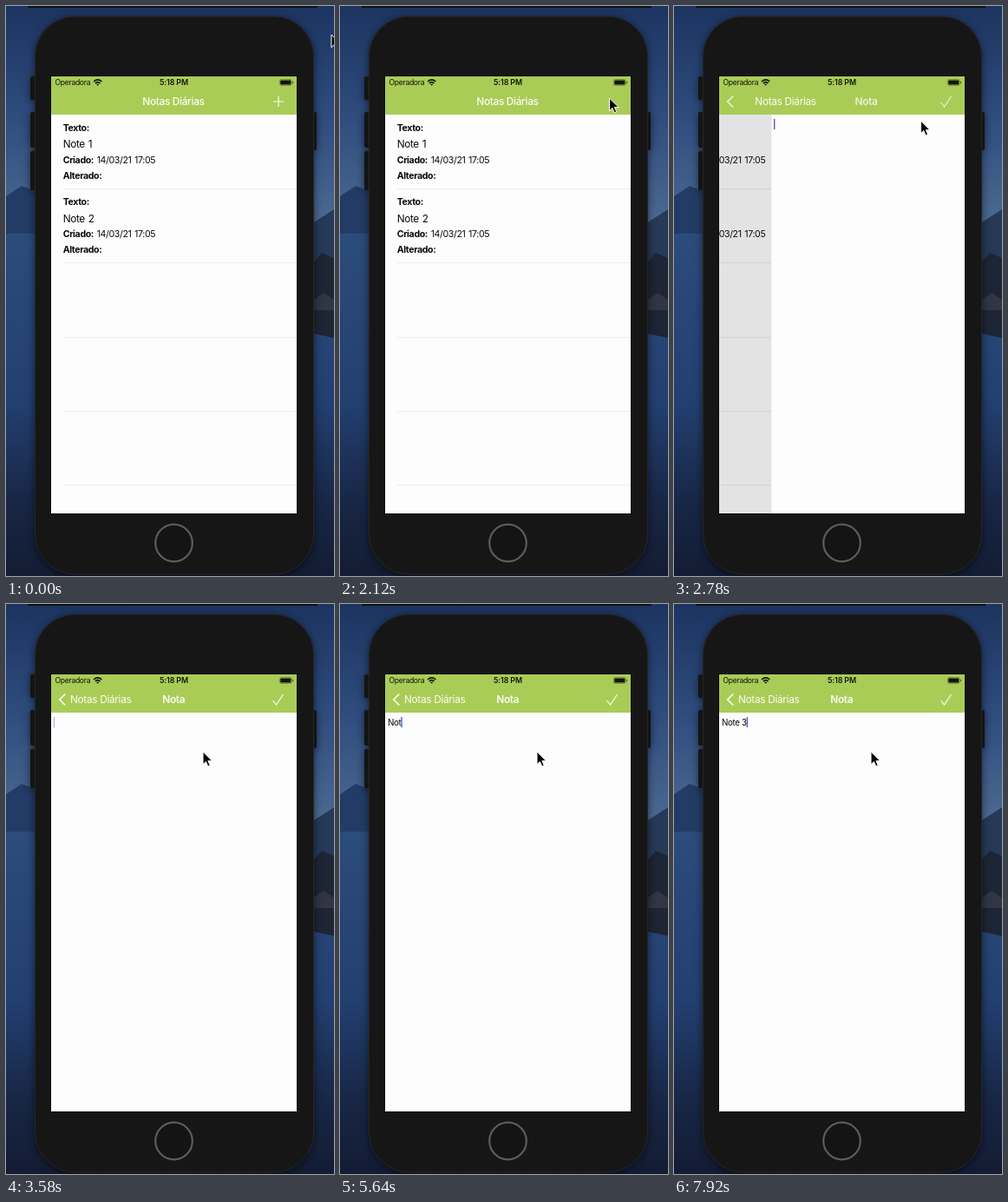
Write an HTML page that moves like this. It is 378 by 656 pixels and loops after 8000 ms.

```html
<!DOCTYPE html>
<html lang="pt">
<head>
<meta charset="utf-8">
<title>Notas</title>
<style>
  html, body { margin: 0; width: 100%; height: 100%; overflow: hidden; background: #16233f; }
  svg { display: block; width: 100%; height: 100%; }
  text { font-family: Inter, Roboto, sans-serif; white-space: pre; }
  .cell { font-size: 10.6px; letter-spacing: -.38px; word-spacing: 1px; fill: #0a0a0a; }
  .bold { font-weight: 700; }
  .note { font-size: 11.8px; letter-spacing: -.35px; }
  .nav { font-size: 11.8px; letter-spacing: -.3px; fill: #fbfdf4; }
  .icon { fill: none; stroke: #fbfdf4; stroke-width: 1.2; }
  .status { font-size: 8.6px; letter-spacing: -.3px; fill: #12160a; }
  .typed { font-size: 9.8px; letter-spacing: -.35px; fill: #0a0a0a; }
  .phone { filter: drop-shadow(0 2px 5px rgba(0, 0, 0, .55)); }
</style>
</head>
<body>
<svg viewBox="0 0 378 656" preserveAspectRatio="none">
  <defs>
    <linearGradient id="sky" x2="0" y2="1">
      <stop offset="0" stop-color="#1c3460"/>
      <stop offset=".5" stop-color="#2f4d7e"/>
      <stop offset="1" stop-color="#4f6c94"/>
    </linearGradient>
    <linearGradient id="water" x2="0" y2="1">
      <stop offset="0" stop-color="#2c4c7c"/>
      <stop offset=".5" stop-color="#223f70"/>
      <stop offset=".78" stop-color="#182746"/>
      <stop offset="1" stop-color="#131c33"/>
    </linearGradient>
    <clipPath id="screen"><rect x="52" y="125" width="283" height="459"/></clipPath>
    <clipPath id="navClip"><rect x="52" y="81" width="283" height="44"/></clipPath>
  </defs>

  <!-- lake backdrop -->
  <rect width="378" height="262" fill="url(#sky)"/>
  <path d="M0 219L18 207L36 214V270H0Z" fill="#233c66"/>
  <rect y="262" width="378" height="394" fill="url(#water)"/>
  <path d="M350 252L378 234V300H350Z" fill="#263a58"/>
  <path d="M350 300L364 284L378 290V382L350 376Z" fill="#1e2534"/>
  <path d="M352 340L366 330L378 338V350H352Z" fill="#303643"/>
  <rect x="25" width="334" height="2" fill="#111"/>

  <!-- phone -->
  <g class="phone">
    <g fill="#141414">
      <rect x="28" y="81" width="8" height="27" rx="2"/>
      <rect x="28" y="122" width="8" height="41" rx="2"/>
      <rect x="28" y="167" width="8" height="45" rx="2"/>
      <rect x="351" y="122" width="7" height="44" rx="2"/>
    </g>
    <rect x="33.5" y="12" width="321" height="642" rx="46" fill="#161616" stroke="#262626"/>
  </g>
  <circle cx="193.5" cy="618" r="21.3" fill="#141414" stroke="#5c5c5c" stroke-width="2.2"/>
  <rect x="51" y="80" width="285" height="505" fill="#0a0a0a"/>
  <rect x="52" y="81" width="283" height="503" fill="#fdfdfd"/>

  <g clip-path="url(#screen)">
    <g id="list"></g>
    <rect id="dim" x="52" y="125" width="283" height="459"/>
    <g id="editor">
      <rect x="52" y="125" width="283" height="459" fill="#fdfdfd"/>
      <text id="typed" class="typed" x="55" y="139.5"></text>
      <rect id="caret" y="130" width="1.4" height="12" fill="#4660c8"/>
    </g>
  </g>

  <rect x="52" y="81" width="283" height="44" fill="#a9cc57"/>
  <g clip-path="url(#navClip)">
    <text id="listTitle" class="nav" y="114">Notas Diárias</text>
    <text id="noteTitle" class="nav" y="114" font-weight="600">Nota</text>
    <path id="back" class="icon" style="stroke-width:1.7" d="M68.3 103.5L61.8 110L68.3 116.5"/>
    <path id="plus" class="icon" d="M308 110H320M314 104V116"/>
    <path id="check" class="icon" d="M307.5 111L311.5 116L319.5 104"/>
  </g>

  <!-- status bar -->
  <text class="status" x="56.5" y="91">Operadora</text>
  <text class="status" x="193.5" y="91" text-anchor="middle" style="font-weight:600;font-size:8.8px;letter-spacing:-.1px">5:18 PM</text>
  <g fill="none" stroke="#12160a" stroke-width="1.5">
    <path d="M101 87Q105.7 82.8 110.4 87M102.8 89Q105.7 86.3 108.6 89"/>
    <path d="M104.3 89.8L105.7 91.4L107.1 89.8" fill="#12160a" stroke-width=".6"/>
  </g>
  <rect x="315.3" y="84.7" width="14" height="6.6" rx="1.8" fill="none" stroke="#5c6c34" stroke-width=".7"/>
  <rect x="316.2" y="85.6" width="12.2" height="4.8" rx="1" fill="#12160a"/>
  <rect x="330" y="86.8" width="1.1" height="2.4" rx=".5" fill="#5c6c34"/>

  <path id="cursor" d="M0 0V14.6L3.4 11.5L5.7 16.8L8.2 15.7L5.9 10.6H10.6Z" fill="#050505" stroke="#fff" stroke-width="1"/>
</svg>
<script>
const LOOP = 8000, WIDTH = 283;
const PUSH = { start: 2560, length: 500 };
const TEXT = 'Note 3';
const KEY_TIMES = [5080, 5320, 5540, 5740, 6200, 6950];
const BLINK_START = 3320;
const POINTER = [
  [0, 375, 33], [860, 323, 84], [1440, 310.5, 106], [2320, 310.5, 106],
  [2780, 284.5, 132], [3300, 227, 170], [LOOP, 227, 170]
];

const el = id => document.getElementById(id);
const clamp = v => Math.max(0, Math.min(1, v));
const mix = (a, b, p) => a + (b - a) * p;
const ramp = (t, from, to) => clamp((t - from) / (to - from));
const fade = (id, opacity) => el(id).setAttribute('opacity', opacity);
const slide = (id, x, y = 0) => el(id).setAttribute('transform', `translate(${x} ${y})`);

function listMarkup() {
  const row = 85.3;
  const cells = [1, 2].map((n, i) => `
    <g transform="translate(0 ${i * row})">
      <text class="cell bold" x="65.7" y="144">Texto:</text>
      <text class="cell note" x="65.7" y="163.3">Note ${n}</text>
      <text class="cell bold" x="65.7" y="181">Criado:</text>
      <text class="cell" x="104.7" y="181">14/03/21 17:05</text>
      <text class="cell bold" x="65.7" y="199">Alterado:</text>
    </g>`);
  const lines = [0, 1, 2, 3, 4].map(i =>
    `<path d="M66 ${Math.round(210 + i * row) + .5}H335" stroke="#ededee"/>`);
  return cells.concat(lines).join('');
}

function pointerAt(t) {
  const i = POINTER.findIndex(k => k[0] > t);
  const [t0, x0, y0] = POINTER[i - 1], [t1, x1, y1] = POINTER[i];
  const p = ramp(t, t0, t1);
  return [mix(x0, x1, p), mix(y0, y1, p)];
}

function draw(t) {
  const push = 1 - (1 - ramp(t, PUSH.start, PUSH.start + PUSH.length)) ** 2.65;
  const pressed = ramp(t, 2020, 2060) * (1 - ramp(t, 2240, 2480));

  slide('list', -.3 * WIDTH * push);
  slide('editor', WIDTH * (1 - push));
  fade('dim', .13 * push);

  el('listTitle').setAttribute('x', mix(157.3, 74, push ** 1.1));
  el('listTitle').setAttribute('font-weight', push > 0 ? 400 : 500);
  el('noteTitle').setAttribute('x', mix(313, 180.3, push));
  ['noteTitle', 'back', 'check'].forEach(id => fade(id, push));
  fade('plus', (1 - .95 * pressed) * (1 - ramp(push, 0, .7)));

  const count = KEY_TIMES.filter(k => k <= t).length;
  const typed = el('typed');
  typed.textContent = TEXT.slice(0, count);
  el('caret').setAttribute('x', 54.7 + (count ? typed.getComputedTextLength() + .2 : 0));
  const idle = Math.max(0, t - (count ? KEY_TIMES[count - 1] : BLINK_START));
  fade('caret', clamp(.5 + 1.2 * Math.cos(idle / 1000 * 2 * Math.PI)));

  slide('cursor', ...pointerAt(t));
}

el('list').innerHTML = listMarkup();
const startTime = performance.now();
function tick() {
  draw((performance.now() - startTime) % LOOP);
  requestAnimationFrame(tick);
}
tick();
</script>
</body>
</html>
```
